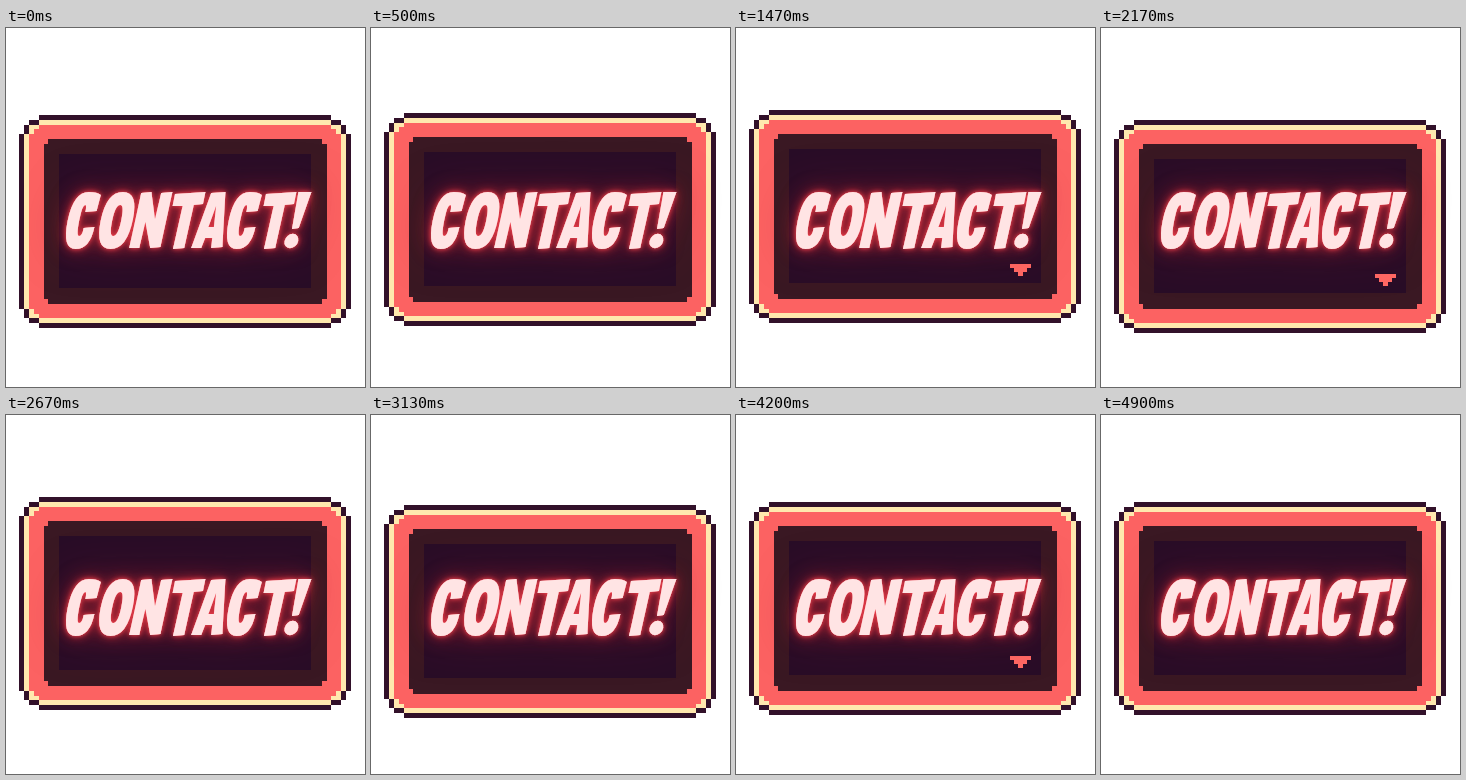
Animation, 359 px wide and 359 px high, one loop 5000 ms. Source, as an HTML page with a canvas:

```html
<!DOCTYPE html>
<html lang="en">
<head>
<meta charset="utf-8">
<title>Contact!</title>
<style>
  html, body { margin: 0; width: 100%; height: 100%; overflow: hidden; background: #fff; }
  canvas { display: block; }
</style>
</head>
<body>
<canvas id="stage" width="359" height="359" role="img" aria-label="CONTACT!"></canvas>
<script>
const ctx = document.getElementById('stage').getContext('2d');
const LOOP = 5000;
const CELL = 4.82;
const BOX = { left: 13.4, right: 344.6, top: 87, bottom: 300 };
const REST = 0.1, SWING = 5.9, BOB_STEPS = 14.93, LAST_STEP = 60;

// Each layer starts at a row; insets give the stepped corner, in cells.
const LAYERS = [
  { color: '#32112a', row: 0, insets: [4, 2, 1, 1, 0] },
  { color: '#ffe8ae', row: 1, insets: [4, 2, 2, 1] },
  { color: '#fc6262', row: 2, insets: [4, 3, 2] },
  { color: '#3a1823', row: 5, insets: [6, 5] }
];

// Upright glyph outlines; the slant is applied when drawing.
const GLYPHS = {
  C: 'M28 3L27 19L16 20Q16 13 14.5 13Q11.5 13 11.5 28Q11.5 44 14.5 44Q17.5 44 17.5 36L28 35Q28 57 13.5 57Q0 57 0 29Q0 0 15.5 0Q24 0 28 3Z',
  O: 'M16.5 0Q32 0 32 27Q32 57 15.5 57Q0 57 0 29Q0 0 16.5 0ZM16.5 13Q11.5 13 11.5 29Q11.5 44 15.5 44Q20.5 44 20.5 28Q20.5 13 16.5 13Z',
  N: 'M0 56L1 1L11 0L20 27L21 1L32 0L31 55L21 56L11 30L10 56Z',
  T: 'M0 2L30 0L30 12L21 13L20 56L9 57L10 14L0 14Z',
  A: 'M0 56L9 1L23 0L31 55L20 56L19 46L12 46L10 56ZM13 35L18.5 35L16.5 14Z',
  '!': 'M4 0L17 0L11.5 36L5 37ZM0 49a6.8 7.2 0 1 0 13.6 0a6.8 7.2 0 1 0 -13.6 0Z'
};
const WORD = 'CONTACT!';
const STARTS = [56, 89, 123, 158, 185, 217, 249, 277];
const SLANT = 0.2, TEXT_TOP = 164, TEXT_BASE = 221;

const lettering = new Path2D();
[...WORD].forEach((ch, i) => {
  const slant = new DOMMatrix([1, 0, -SLANT, 1, STARTS[i] + SLANT * (TEXT_BASE - TEXT_TOP), TEXT_TOP]);
  lettering.addPath(new Path2D(GLYPHS[ch]), slant);
});

// Fills edge to edge on whole pixels, so neighbouring cells leave no seam.
function block(x0, y0, x1, y1) {
  const [l, t, r, b] = [x0, y0, x1, y1].map(Math.round);
  ctx.fillRect(l, t, r - l, b - t);
}

function drawFrame(dy) {
  const top = BOX.top + dy, bottom = BOX.bottom + dy;
  for (const { color, row, insets } of LAYERS) {
    ctx.fillStyle = color;
    insets.forEach((inset, i) => {
      const dx = inset * CELL, edge = (row + i) * CELL;
      block(BOX.left + dx, top + edge, BOX.right - dx, bottom - edge);
    });
  }
  ctx.fillStyle = '#290d27';
  block(53, top + 39, 305, bottom - 40);
}

function drawArrow(dy) {
  ctx.fillStyle = '#ff6964';
  [10.5, 6.3, 2.2].forEach((half, i) => {
    const y = 240.6 + dy + i * 4;
    block(284.5 - half, y, 284.5 + half, y + 4);
  });
}

function drawLettering() {
  ctx.save();
  ctx.fillStyle = '#ffe4e4';
  for (const [color, blur] of [['rgba(150,25,45,0.5)', 44], ['rgba(190,40,50,0.6)', 20], ['#c62c3a', 10], ['#f04450', 4]]) {
    ctx.shadowColor = color;
    ctx.shadowBlur = blur;
    ctx.fill(lettering, 'evenodd');
  }
  ctx.restore();
}

// The picture advances in uneven steps of a 30 Hz clock.
function stepAt(t) {
  const tick = Math.floor((t + 5) * 0.03);
  const step = Math.floor((tick + 0.13) / 2.408);
  return step === LAST_STEP ? LAST_STEP - 1 : step;
}

// Rest, top, rest, bottom, with easing into and out of each.
function bobAt(step) {
  if (step > LAST_STEP) return 0;
  const phase = step / BOB_STEPS % 1;
  const half = phase * 2 % 1;
  const reach = (1 - Math.cos(2 * Math.PI * half)) / 2;
  return Math.round(REST + SWING * reach * (phase < 0.5 ? -1 : 1));
}

function render(now) {
  const step = stepAt(now % LOOP);
  const dy = bobAt(step);
  ctx.fillStyle = '#fff';
  ctx.fillRect(0, 0, 359, 359);
  drawFrame(dy);
  if (step % 30 >= 15 && step < LAST_STEP) drawArrow(dy);
  drawLettering();
}

const start = performance.now();
function tick() {
  render(performance.now() - start);
  requestAnimationFrame(tick);
}
tick();
</script>
</body>
</html>
```
